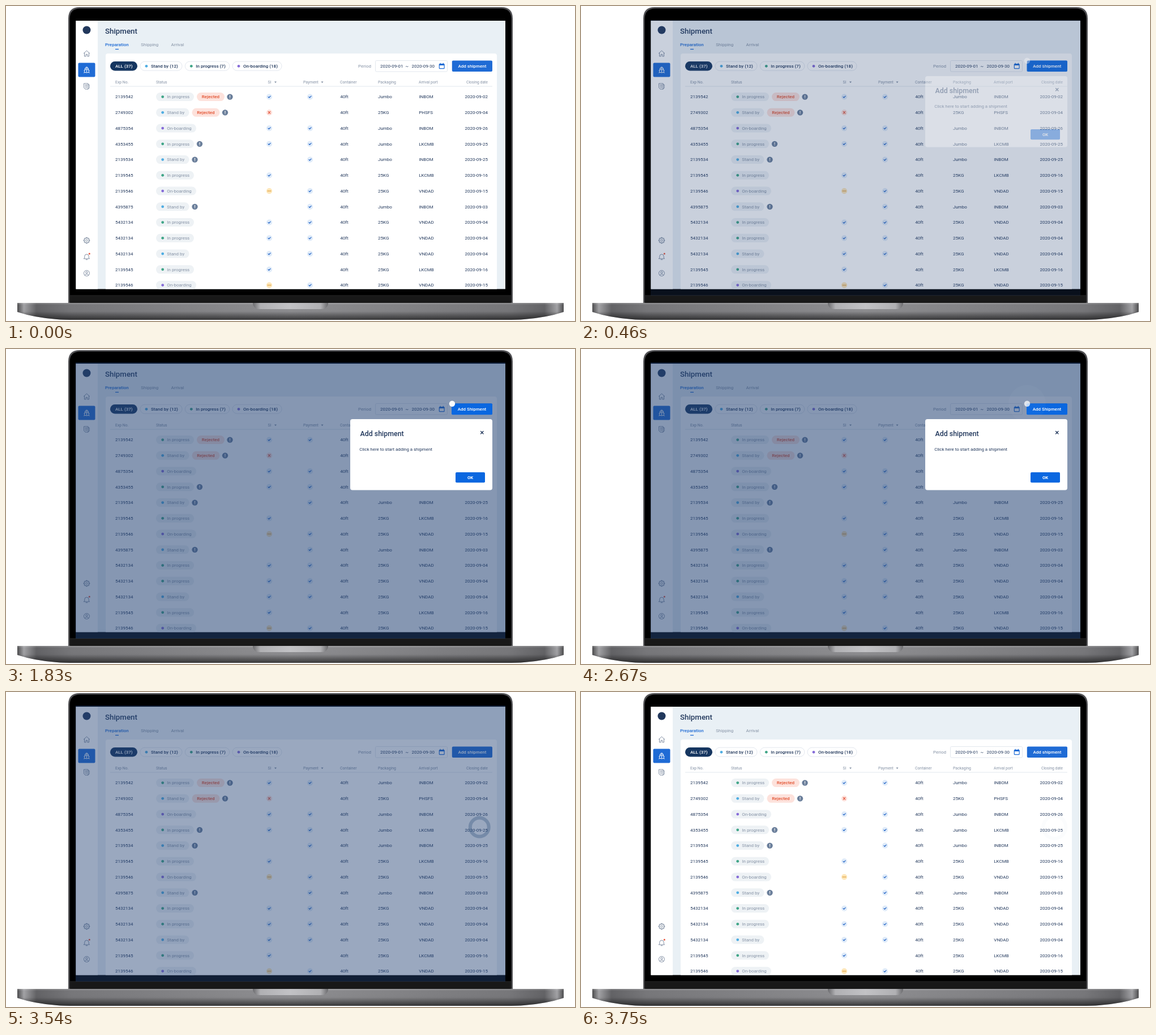
Recreate the animation shown at these times as an HTML page. Size 1005 px wide and 557 px high, loop 5000 ms.

```html
<!DOCTYPE html>
<html lang="en">
<head>
<meta charset="utf-8">
<style>
html, body { margin: 0; width: 100%; height: 100%; overflow: hidden; background: #fff; }
svg { display: block; width: 1005px; height: 557px; font-family: Roboto, Arial, sans-serif; }
</style>
</head>
<body>
<svg id="stage" viewBox="0 0 1005 557"></svg>
<script>
const NAVY = '#22385c', BLUE = '#1f6bd5', BRIGHT = '#0a67e0', GREY = '#8592a5', LINE = '#dfe5ec';
const DOTS = { 'In progress': '#3fa587', 'Stand by': '#4fade2', 'On-boarding': '#866cd8' };
const PILL_WIDTH = { 'In progress': 67, 'Stand by': 58.5, 'On-boarding': 71 };

const rect = (x, y, w, h, fill, r = 0, more = '') =>
  `<rect x="${x}" y="${y}" width="${w}" height="${h}" rx="${r}" fill="${fill}" ${more}/>`;
const circle = (x, y, r, fill, more = '') => `<circle cx="${x}" cy="${y}" r="${r}" fill="${fill}" ${more}/>`;
const line = (d, color, width = 1, more = '') =>
  `<path d="${d}" fill="none" stroke="${color}" stroke-width="${width}" stroke-linecap="round" stroke-linejoin="round" ${more}/>`;
// y is the middle of the text line
const text = (s, x, y, fill = NAVY, size = 8, weight = 400, anchor = 'start') =>
  `<text x="${x}" y="${y + size * .36}" fill="${fill}" font-size="${size}" font-weight="${weight}" text-anchor="${anchor}">${s}</text>`;
const icon = (x, y, body) => `<g transform="translate(${x} ${y})">${body}</g>`;

function gradient(id, stops, vertical) {
  const end = vertical ? 'x2="0" y2="1"' : '';
  return `<linearGradient id="${id}" ${end}>` +
    stops.map(([at, color, alpha = 1]) => `<stop offset="${at}" stop-color="${color}" stop-opacity="${alpha}"/>`).join('') +
    '</linearGradient>';
}

function laptop() {
  return '<defs>' +
    gradient('metal', [[0, '#4c4c4e'], [.012, '#a2a2a5'], [.035, '#626265'], [.1, '#77777a'], [.5, '#8e8e91'],
      [.9, '#77777a'], [.965, '#626265'], [.988, '#a2a2a5'], [1, '#4c4c4e']]) +
    gradient('shade', [[0, '#fff', .22], [.12, '#fff', 0], [.5, '#000', .02], [.75, '#000', .32], [1, '#000', .6]], true) +
    gradient('notch', [[0, '#6b6b6e'], [.1, '#b0b0b3'], [.5, '#c2c2c5'], [.9, '#b0b0b3'], [1, '#6b6b6e']]) +
    '<clipPath id="screen"><rect x="123.5" y="26" width="758.5" height="474.5"/></clipPath></defs>' +
    '<path d="M110 526V22Q110 2 130 2H875Q895 2 895 22V526Z" fill="#505053"/>' +
    '<path d="M112.5 524V23Q112.5 4.5 131 4.5H874Q892.500 4.500 892.500 23V524Z" fill="#000"/>' +
    rect(113, 512, 779, 13, '#181818') + rect(113, 511.5, 779, .8, '#2a2a2a') +
    ['metal', 'shade'].map(id =>
      `<path d="M20 525H985V541Q955 551 915 554Q905 555 880 555H125Q100 555 90 554Q50 551 20 541Z" fill="url(#${id})"/>`).join('') +
    '<path d="M436 525H569V526Q568 536 556 536H449Q437 536 436 526Z" fill="url(#notch)"/>';
}

function sidebar() {
  const ink = '#75849a', x = 142.5;
  const teeth = Array.from({ length: 8 }, (_, i) =>
    `<path d="M-1.300 -4L-.8 -5.300H.8L1.300 -4" transform="rotate(${i * 45})" fill="none" stroke="${ink}" stroke-width=".9"/>`).join('');
  return rect(123, 26, 39, 475, '#fff') + circle(x, 42.500, 7, NAVY) +
    icon(x, 84, line('M-5 -.5L0 -5L5 -.5M-4 -1V5H-1.300V1.500H1.300V5H4V-1', ink, .9)) +
    rect(127.5, 100.5, 30, 25, BLUE, 2) +
    icon(x, 113, line('M-3.500 4L-4.500 .5L0 -1L4.500 .5L3.500 4M-3 0V-3H3V0M-1.200 -3V-5H1.200V-3M0 -1V4M-5 5Q-2.500 3.500 0 5Q2.500 3.500 5 5', '#fff', .9)) +
    icon(x, 142, line('M-4.500 -5H2.500V5H-2.500L-4.500 3ZM2.500 -3H4.500V3L2.500 5M-2.500 -2.500H.7M-2.500 -.3H.7M-2.500 2H.7', ink, .9)) +
    icon(x, 414.5, teeth + circle(0, 0, 4.1, 'none', `stroke="${ink}" stroke-width=".8"`) +
      circle(0, 0, 1.8, 'none', `stroke="${ink}" stroke-width=".9"`)) +
    icon(x, 443.500, line('M-5 3.300H5L3.700 1.500V-1Q3.500 -4.500 0 -4.500Q-3.500 -4.500 -3.700 -1V1.500ZM-1.300 5H1.300', ink, .9)) +
    circle(147.3, 438, 1.5, '#e8533a') +
    icon(x, 472.5, circle(0, 0, 5, 'none', `stroke="${ink}" stroke-width=".9"`) +
      circle(0, -1.3, 1.7, 'none', `stroke="${ink}" stroke-width=".9"`) + line('M-3.200 3.500Q-2.500 1.500 0 1.500Q2.500 1.500 3.200 3.500', ink, .9));
}

function header() {
  const chip = (x, w, status, n) =>
    rect(x, 98.2, w, 16, '#fff', 8, `stroke="${LINE}" stroke-width=".9"`) +
    circle(x + 11, 106.3, 2.4, DOTS[status]) + text(`${status} (${n})`, x + 19, 106.3, NAVY, 8, 500);
  const sort = x => `<path d="M${x - 2} 133.500h4l-2 2.800z" fill="${GREY}"/>`;
  const titles = [['Exp No.', 193], ['Status', 265], ['SI', 462.5], ['Payment', 525], ['Container', 590],
    ['Packaging', 657], ['Arrival port', 729]];
  return text('Shipment', 175, 44, NAVY, 13.3, 500) +
    text('Preparation', 175, 68.5, BLUE, 8, 500) + rect(193, 75.8, 6, 1.3, BLUE) +
    text('Shipping', 238.3, 68.5, GREY) + text('Arrival', 291.5, 68.5, GREY) +
    rect(176, 84, 691, 430, '#fff', 4) +
    rect(184, 98, 48, 16.5, '#163660', 8.2) + text('ALL (37)', 208.3, 106.3, '#fff', 8, 500, 'middle') +
    chip(237, 74, 'Stand by', 12) + chip(316.3, 78.5, 'In progress', 7) + chip(400, 87, 'On-boarding', 18) +
    text('Period', 622, 106.2, GREY) +
    rect(652.500, 96.5, 127, 19.5, '#fff', 2, `stroke="${LINE}" stroke-width=".9"`) +
    text('2020-09-01', 661, 106.2) + text('~', 705.500, 106.2) + text('2020-09-30', 716.5, 106.2) +
    rect(764.7, 102, 10, 9.300, BLUE, 1.5) + rect(765.9, 105, 7.6, 5.1, '#fff', .5) +
    rect(766.500, 100.700, 1.2, 2.5, BLUE) + rect(771.7, 100.700, 1.2, 2.5, BLUE) +
    rect(787.8, 96.5, 71.2, 19.5, BLUE, 2) + text('Add shipment', 823.4, 106.3, '#fff', 8, 500, 'middle') +
    titles.map(([s, x]) => text(s, x, 134.8, GREY, 6.85)).join('') +
    text('Closing date', 851, 134.8, GREY, 6.85, 400, 'end') + sort(476) + sort(558.5) +
    rect(184, 141.6, 675, .9, LINE);
}

const MARKS = {
  v: ['#dfebf9', line('M-2 .1L-.6 1.500L2 -1.300', '#1c5fc4', 1.2)],
  x: ['#fde0da', line('M-1.700 -1.700L1.700 1.700M1.700 -1.700L-1.700 1.700', '#e0492f', 1.2)],
  o: ['#fde6b8', [-2.3, 0, 2.3].map(x => circle(x, 0, .85, '#d88f24')).join('')],
};
const mark = (kind, x, y) => MARKS[kind] ? icon(x, y, circle(0, 0, 5.1, MARKS[kind][0]) + MARKS[kind][1]) : '';

// number, status, flags (r: rejected, i: info), SI mark, payment mark, packaging, port, day
const ROWS = `2139542 In progress,ri,v,v,Jumbo,INBOM,02
2749302 Stand by,ri,x,,25KG,PHSFS,04
4875354 On-boarding,,v,v,Jumbo,INBOM,26
4353455 In progress,i,v,v,Jumbo,LKCMB,25
2139534 Stand by,i,,v,Jumbo,INBOM,25
2139545 In progress,,v,,25KG,LKCMB,16
2139546 On-boarding,,o,v,25KG,VNDAD,15
4395875 Stand by,i,,v,Jumbo,INBOM,03
5432134 In progress,,v,v,25KG,VNDAD,04
5432134 In progress,,v,v,25KG,VNDAD,04
5432134 Stand by,,v,v,25KG,VNDAD,04
2139545 In progress,,v,,25KG,LKCMB,16
2139546 On-boarding,,o,v,25KG,VNDAD,15`.split('\n');

function tableRow(row, i) {
  const [head, flags, si, paid, packaging, port, day] = row.split(',');
  const status = head.slice(8), y = 160.6 + i * 27.75;
  let end = 265 + PILL_WIDTH[status];
  let out = text(head.slice(0, 7), 193, y) +
    rect(265, y - 7.5, PILL_WIDTH[status], 15, '#eef2f5', 7.5) +
    circle(276.7, y, 2.4, DOTS[status]) + text(status, 284.3, y, GREY);
  if (flags.includes('r')) {
    out += rect(end + 5, y - 7.5, 49, 15, '#fde2dc', 7.5) + text('Rejected', end + 29.5, y, '#e2502f', 8, 500, 'middle');
    end += 53.5;
  }
  if (flags.includes('i'))
    out += circle(end + 10, y, 5.2, '#6b7f9b') + rect(end + 9.4, y - 2.7, 1.2, 3.3, '#fff') + rect(end + 9.4, y + 1.4, 1.2, 1.2, '#fff');
  return out + mark(si, 465, y) + mark(paid, 537, y) + text('40ft', 590.3, y) +
    text(packaging, 657, y) + text(port, 729.3, y) + text('2020-09-' + day, 851, y, NAVY, 8, 400, 'end');
}

function modal() {
  return rect(787, 96.3, 72, 19.9, BRIGHT, 2) + text('Add Shipment', 823, 106.3, '#fff', 8, 500, 'middle') +
    circle(788, 96.5, 5, '#fff', 'id="wave"') +
    rect(608, 124, 251, 125.5, '#fff', 4) + text('Add shipment', 625.5, 149.3, NAVY, 12.4, 500) +
    icon(840.8, 147.7, line('M-2.200 -2.200L2.200 2.200M2.200 -2.200L-2.200 2.200', NAVY, 1.4)) +
    text('Click here to start adding a shipment', 624.3, 177.6, NAVY, 7.9) +
    rect(794, 218, 52, 18.3, BRIGHT, 2) + text('OK', 820, 227.4, '#fff', 7.7, 700, 'middle') +
    circle(788, 96.7, 5.2, '#fff', 'id="dot"');
}

document.getElementById('stage').innerHTML = laptop() +
  '<g clip-path="url(#screen)">' + rect(123, 26, 760, 475, '#e9f0f5') + sidebar() + header() + ROWS.map(tableRow).join('') + '</g>' +
  rect(123, 24, 759, 488, 'rgb(36,66,115)', 0, 'id="veil"') + `<g id="modal">${modal()}</g>` +
  circle(836.3, 239, 15, 'none', 'id="ring" stroke="#3d5c86" stroke-width="6"');

const set = (id, attrs) => {
  const el = document.getElementById(id);
  for (const key in attrs) el.setAttribute(key, attrs[key]);
};
const clamp = v => Math.min(1, Math.max(0, v));

function draw(t) {
  // the veil comes in four hard steps and eases out
  const fadeIn = t < 420 ? 0 : clamp((Math.floor((t - 420) / 40) + 1) / 4);
  const fadeOut = clamp((t - 3400) / 350);
  set('veil', { opacity: .55 * (fadeIn < 1 ? fadeIn * .9 : 1 - fadeOut ** 2) });
  set('modal', { opacity: clamp((fadeIn - .25) / .75) * (1 - clamp((t - 3400) / 120)) });

  const beat = Math.max(0, t - 570) % 1400 / 1400;
  set('dot', { opacity: .87 + .13 * Math.cos(2 * Math.PI * beat) });
  set('wave', { r: 5 + 28 * clamp(beat * 2), opacity: .1 * (1 - beat) ** 2 });

  const grow = clamp((t - 3100) / 650);
  set('ring', { r: 9 + 11 * grow, opacity: clamp((t - 3100) / 100) * (.02 + .98 * (1 - grow) ** .6 * (1 - grow * .35)) });
}

const start = performance.now();
function tick() {
  draw((performance.now() - start) % 5000);
  requestAnimationFrame(tick);
}
tick();
</script>
</body>
</html>
```
